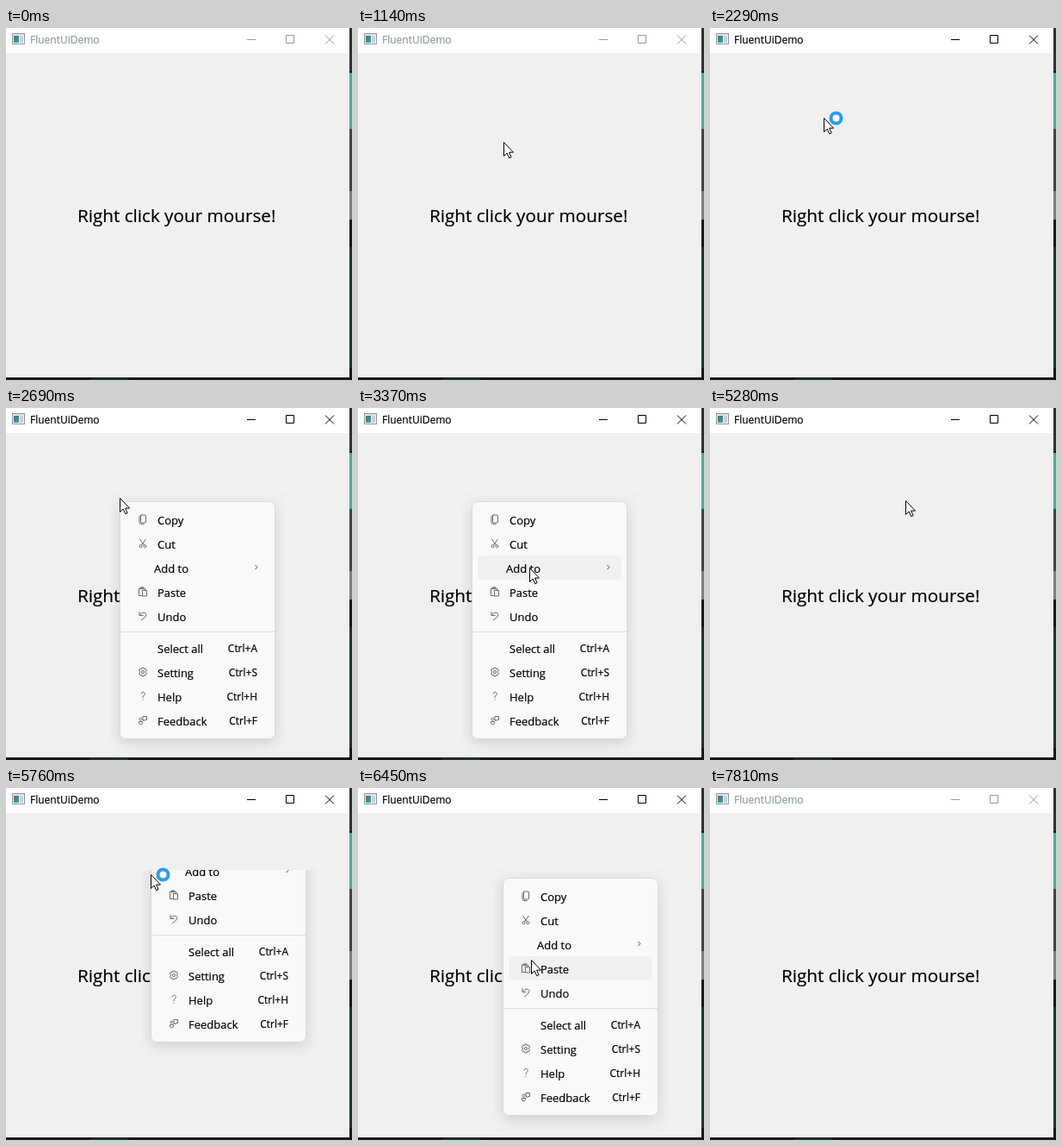
An HTML page with a canvas that plays this animation: 402 px wide and 408 px high, repeating every 7.88 s.

```html
<!DOCTYPE html>
<html lang="en">
<head>
<meta charset="utf-8">
<title>FluentUiDemo</title>
<style>
html, body { margin: 0; width: 100%; height: 100%; overflow: hidden; background: #f0f0f0; }
canvas { display: block; }
</style>
</head>
<body>
<canvas id="stage" width="402" height="408"></canvas>
<script>
const LOOP = 7880, STEP = 67.5;
const c = document.getElementById('stage').getContext('2d');
const FONT = '"Open Sans", "Noto Sans", sans-serif';

// Pointer moves: start, end, then a quadratic curve (from, control, to)
const moves = [
  [590, 1330, 284, 318, 215, 175, 143, 104],
  [1400, 1401, 132, 104, 132, 104, 132, 104],
  [3020, 3370, 132, 104, 168, 140, 199, 185],
  [3930, 4410, 199, 185, 260, 184, 317, 194],
  [4870, 5630, 317, 194, 190, 52, 168, 100],
  [5960, 6450, 168, 100, 188, 150, 201, 199],
  [6580, 7340, 201, 199, 280, 275, 337, 396],
  [7410, 7411, 359, 398, 359, 398, 359, 398]
];

const icons = {
  Copy: 'M-2.5-5h5q1 0 1 1v7q0 1-1 1h-4q-1 0-1-1zM-3-3.5q-1 0-1 1v6q0 2 2 2h3.5',
  Cut: 'M-3.5-5L1.5 2M3.5-5L-1.5 2M-1 3.2a1.5 1.5 0 1 1-3 0a1.5 1.5 0 1 1 3 0M4 3.2a1.5 1.5 0 1 1-3 0a1.5 1.5 0 1 1 3 0',
  Paste: 'M-1 4.5h-3.5v-8.5h7v2M-2.5-5.2h3v2h-3zM-.5-1.5h5v6.5h-5z',
  Undo: 'M-4-5v4.5h4.5M-3.5-1C-1-5 4-4.5 4-1.2Q4 1-2 5',
  Setting: 'M-1-5h2l.6 1.5 1.8-.3 1 1.8L3.4 0l1 1.8-1 1.8-1.8-.2L1 5h-2l-.6-1.6-1.8.2-1-1.8 1-1.8-1-2 1-1.8 1.8.3zM1.6 0a1.6 1.6 0 1 1-3.2 0a1.6 1.6 0 1 1 3.2 0',
  Help: 'M-2-2.5C-2-5.5 2.5-5.5 2.3-2.5Q2 -.8 0 .5V2M0 3.5v1.2',
  Feedback: 'M0-4.5h4.5v4H2.5l-1.5 1.5V-.5H0zM-1-1.5a1.5 1.5 0 1 1-3 0a1.5 1.5 0 1 1 3 0M-4.5 1.5h4v1.5q-.5 2-2 2t-2-2z',
  Music: 'M-4.5-4.5h9v9h-9zM2.8 0a2.8 2.8 0 1 1-5.6 0a2.8 2.8 0 1 1 5.6 0M1 0a1 1 0 1 1-2 0a1 1 0 1 1 2 0',
  Video: 'M-4-4h5q1 0 1 1v6q0 1-1 1h-5q-1 0-1-1v-6q0-1 1-1zM2-1l3-2v6l-3-2'
};

const mainMenu = {
  w: 181, h: 276, rule: 151,
  items: [['Copy', 21], ['Cut', 49], ['Add to', 77], ['Paste', 105], ['Undo', 133],
    ['Select all', 170, 'Ctrl+A'], ['Setting', 198, 'Ctrl+S'], ['Help', 226, 'Ctrl+H'], ['Feedback', 254, 'Ctrl+F']]
};
const subMenu = { w: 102, h: 71, items: [['Music', 21], ['Video', 49]] };

function rect(x, y, w, h, color) {
  c.fillStyle = color;
  c.fillRect(x, y, w, h);
}

function round(x, y, w, h, r) {
  c.beginPath();
  c.roundRect(x, y, w, h, r);
}

// A hairline stroke gives the slightly heavier screen weight
function text(s, x, y, size, color = '#000', align = 'left') {
  c.font = `${size}px ${FONT}`;
  c.textAlign = align;
  c.fillStyle = c.strokeStyle = color;
  c.lineWidth = .2;
  c.fillText(s, x, y);
  c.strokeText(s, x, y);
}

function line(path, x, y, color, width = 1) {
  c.save();
  c.translate(x, y);
  c.strokeStyle = color;
  c.lineWidth = width;
  c.stroke(new Path2D(path));
  c.restore();
}

function pointerAt(t) {
  if (t < 590 || t >= 7480) return null;
  const [start, end, x0, y0, cx, cy, x1, y1] = moves.findLast(m => m[0] <= t);
  const steps = Math.max(1, Math.round((end - start) / STEP));
  const p = Math.min(1, Math.floor((t - start) / (end - start) * steps + .001) / steps);
  const e = p * p * (3 - 2 * p);
  const curve = (a, b, d) => Math.round(a * (1 - e) ** 2 + 2 * b * e * (1 - e) + d * e * e);
  return { x: curve(x0, cx, x1), y: curve(y0, cy, y1) };
}

// Share of the slide still to go; equals cubic-bezier(0, 0, 0, 1)
function slideLeft(dt) {
  const u = Math.cbrt(Math.min(1, Math.floor(dt / 70) * 70 / 270));
  return 1 - u * u * (3 - 2 * u);
}

function drawDesktop() {
  rect(0, 0, 402, 408, '#171717');
  rect(399, 0, 3, 50, '#302e31');
  rect(399, 52, 3, 65, '#35b49f');
  rect(399, 117, 3, 72, '#453f43');
  rect(399, 189, 3, 33, '#817e80');
  rect(399, 254, 3, 140, '#193331');
  rect(97, 406, 45, 2, '#20332f');
}

function drawWindow(active) {
  rect(0, 0, 399, 405, '#f0f0f0');
  rect(0, 0, 399, 29, '#fff');
  rect(7, 6, 15, 13, '#8c9698');
  rect(8, 7, 13, 2, '#dce6ea');
  rect(8, 9, 13, 9, '#f4f6f6');
  const blue = c.createLinearGradient(8, 9, 15, 18);
  blue.addColorStop(0, '#416f9c');
  blue.addColorStop(1, '#4ba382');
  rect(9, 9, 6, 8, blue);
  rect(16, 9, 4, 8, '#c9d2d3');
  text('FluentUiDemo', 28, 18, 12, active ? '#000' : '#8f9c98');
  line('M280 13.5h10M325.5 8.5h9v9h-9zM371 8.5l10 10M381 8.5l-10 10', 0, 0, active ? '#000' : '#999');
  text('Right click your mourse!', 83, 225, 20.7);
}

function drawMenu(menu, x, y, dt, pointer, forced) {
  c.save();
  c.beginPath();
  c.rect(x - 12, y - 9, menu.w + 24, menu.h + 30);
  c.clip();
  y -= Math.round((menu.h + 9) * slideLeft(dt));

  c.save();
  c.shadowColor = 'rgba(0,0,0,.13)';
  c.shadowBlur = 15;
  c.shadowOffsetY = 4;
  round(x, y, menu.w, menu.h, 7);
  c.fillStyle = '#f9f9f9';
  c.fill();
  c.restore();
  round(x + .5, y + .5, menu.w - 1, menu.h - 1, 7);
  c.strokeStyle = '#d9d9d9';
  c.lineWidth = 1;
  c.stroke();
  if (menu.rule) rect(x + 1, y + menu.rule, menu.w - 2, 1, '#dedede');

  for (const [label, mid, keys] of menu.items) {
    const top = y + mid - 14, my = y + mid + 1;
    const hover = pointer && pointer.x >= x + 6 && pointer.x < x + menu.w - 6 &&
      pointer.y >= top && pointer.y < top + 28;
    if (forced ? label === forced : hover) {
      round(x + 7, top, menu.w - 14, 28, 5);
      c.fillStyle = '#f0f0f0';
      c.fill();
    }
    const nested = label === 'Add to';
    text(label, x + (nested ? 40 : 44), my + 5, 13);
    if (icons[label]) line(icons[label], x + 27, my - 1, '#5c5c5c', .9);
    if (keys) text(keys, x + 160, my + 4, 12, '#000', 'right');
    if (nested) line('M-1-2.5L1.5 0-1 2.5', x + 158.5, my - 1.5, '#444');
  }
  c.restore();
}

function drawPointer({ x, y }, busy) {
  c.save();
  c.translate(x + .5, y + .5);
  c.lineJoin = 'round';
  const arrow = new Path2D('M0 0v16l3.7-3.5 2.5 5.7 2.4-1-2.5-5.6H11z');
  c.fillStyle = '#fff';
  c.fill(arrow);
  c.strokeStyle = '#000';
  c.lineWidth = 1;
  c.stroke(arrow);
  if (busy) {
    c.beginPath();
    c.arc(14, 0, 6, 0, 2 * Math.PI);
    c.fill();
    c.strokeStyle = '#2d9bef';
    c.lineWidth = 4;
    c.stroke();
  }
  c.restore();
}

function draw(t) {
  const within = (a, b) => t >= a && t < b;
  const pointer = pointerAt(t);
  drawDesktop();
  drawWindow(within(1620, 7810));
  if (within(2350, 4870)) {
    drawMenu(mainMenu, 132, 108, t - 2350, pointer, t >= 3720 && 'Add to');
    if (t >= 3720) drawMenu(subMenu, 301, 170, t - 3650, pointer);
  }
  if (within(5690, 6580)) drawMenu(mainMenu, 168, 104, t - 5690, pointer);
  if (pointer) drawPointer(pointer, within(2290, 2630) || within(5690, 5960));
}

function tick() {
  draw(performance.now() % LOOP);
  requestAnimationFrame(tick);
}
tick();
</script>
</body>
</html>
```
